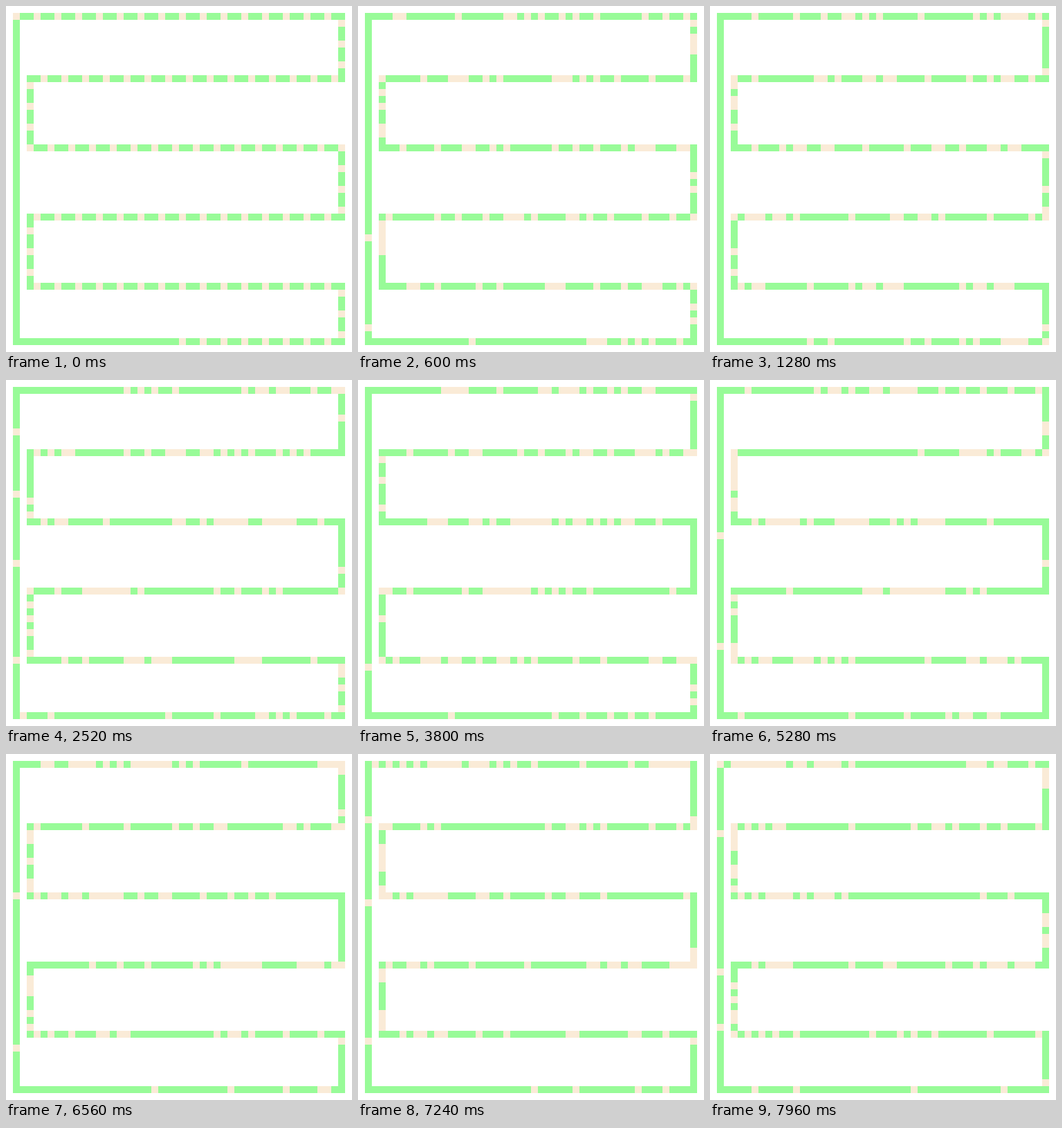
These frames come from a looping animation (500x500 px, 8 s). An HTML page with a canvas:

```html
<!DOCTYPE html>
<html lang="en">
<head>
<meta charset="utf-8">
<title>Traffic on a ring road</title>
<style>
  html, body { margin: 0; width: 100%; height: 100%; overflow: hidden; background: #fff; }
  canvas { display: block; }
</style>
</head>
<body>
<canvas id="stage" width="500" height="500"></canvas>
<script>
const ctx = document.getElementById('stage').getContext('2d');
const CELL = 10, CARS = 100, SPACING = 3;
const STEPS = 200, STEP_MS = 40;
const MAX_SPEED = 5, SLOWDOWN = 0.7;

// Corners of the closed road in grid cells, in driving order
const corners = [
  [1, 1], [48, 1], [48, 10], [3, 10], [3, 20], [48, 20],
  [48, 30], [3, 30], [3, 40], [48, 40], [48, 48], [1, 48]
];

function traceRoad() {
  const road = [];
  corners.forEach(([x, y], i) => {
    const [tx, ty] = corners[(i + 1) % corners.length];
    const dx = Math.sign(tx - x), dy = Math.sign(ty - y);
    while (x !== tx || y !== ty) {
      road.push([x, y]);
      x += dx;
      y += dy;
    }
  });
  return road;
}

function seededRandom(seed) {
  return () => {
    seed = (seed + 0x6D2B79F5) | 0;
    let t = Math.imul(seed ^ (seed >>> 15), 1 | seed);
    t = (t + Math.imul(t ^ (t >>> 7), 61 | t)) ^ t;
    return ((t ^ (t >>> 14)) >>> 0) / 4294967296;
  };
}

// Nagel-Schreckenberg model: accelerate, keep the gap, dawdle, move
function simulate(length) {
  const random = seededRandom(7);
  let pos = Array.from({ length: CARS }, (_, i) => i * SPACING);
  let speed = pos.map(() => 0);
  const history = [pos];
  while (history.length < STEPS) {
    speed = speed.map((v, i) => {
      const ahead = pos[(i + 1) % CARS];
      const gap = (ahead - pos[i] + length) % length - 1;
      const next = Math.min(v + 1, MAX_SPEED, gap);
      return random() < SLOWDOWN ? Math.max(next - 1, 0) : next;
    });
    pos = pos.map((p, i) => (p + speed[i]) % length);
    history.push(pos);
  }
  return history;
}

const road = traceRoad();
const history = simulate(road.length);

function fillCell([x, y]) {
  ctx.fillRect(x * CELL, y * CELL, CELL, CELL);
}

function draw(step) {
  ctx.fillStyle = '#fff';
  ctx.fillRect(0, 0, 500, 500);
  ctx.fillStyle = '#98fb98';
  road.forEach(fillCell);
  ctx.fillStyle = '#faebd7';
  history[step].forEach(p => fillCell(road[p]));
}

const start = performance.now();
function tick() {
  const elapsed = Math.max(0, performance.now() - start);
  draw(Math.floor(elapsed / STEP_MS) % STEPS);
  requestAnimationFrame(tick);
}
tick();
</script>
</body>
</html>
```
